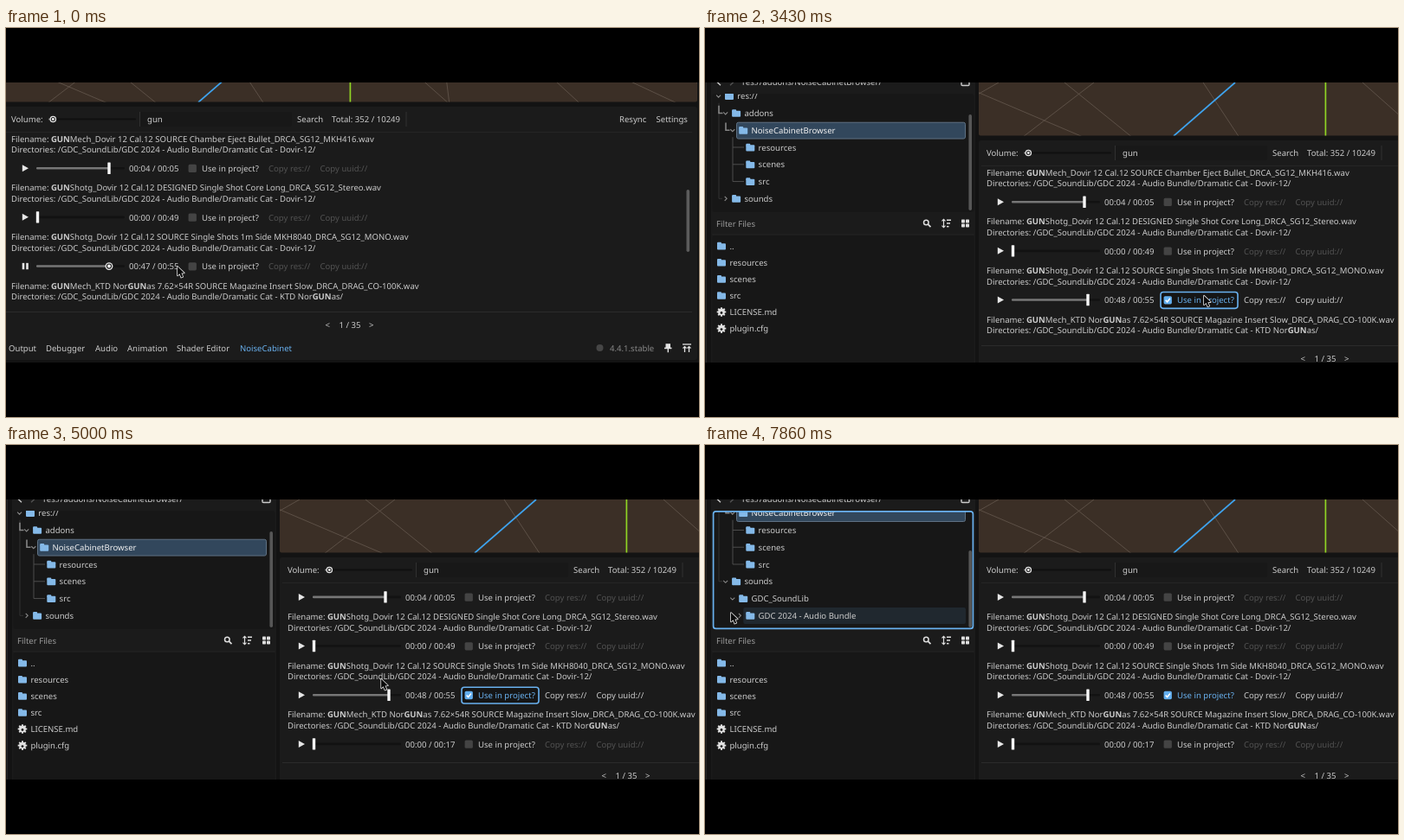
Write an HTML page with a canvas that moves like this. It is 800 px wide and 450 px high and loops after 8 s.

```html
<!DOCTYPE html>
<html lang="en">
<head>
<meta charset="utf-8">
<title>Sound browser</title>
<style>
html, body { margin: 0; width: 100%; height: 100%; overflow: hidden; background: #000; }
canvas { display: block; }
</style>
</head>
<body>
<canvas id="stage" width="800" height="450"></canvas>
<script>
const ctx = document.getElementById('stage').getContext('2d');
const LOOP = 8000, FPS = 7;
const FONT = '9.57px "Noto Sans", sans-serif';
const TEXT = '#cbcbcb', DIM = '#525252', BLUE = '#69b1ef', FOLDER = '#84b9e8';
const DOCK = { x: 319, y: 39 };
const TREE_PITCH = 19.77, ROW_PITCH = 56.67;

// Drawing helpers
function text(str, x, y, color = TEXT) {
  ctx.fillStyle = color;
  // Matches of the search term are bold
  for (const part of str.split(/(GUN)/)) {
    ctx.font = (part === 'GUN' ? 'bold ' : '') + FONT;
    ctx.fillText(part, x, y + 3.7);
    x += ctx.measureText(part).width;
  }
}
function rect(x, y, w, h, color, radius = 0) {
  ctx.fillStyle = color;
  ctx.beginPath();
  ctx.roundRect(x, y, w, h, radius);
  ctx.fill();
}
function outline(x, y, w, h, color, width = 1.6, radius = 3) {
  ctx.strokeStyle = color;
  ctx.lineWidth = width;
  ctx.beginPath();
  ctx.roundRect(x, y, w, h, radius);
  ctx.stroke();
}
function line(points, color, width = 1) {
  ctx.strokeStyle = color;
  ctx.lineWidth = width;
  ctx.beginPath();
  points.forEach(([x, y]) => ctx.lineTo(x, y));
  ctx.stroke();
}
function shape(points, color) {
  ctx.fillStyle = color;
  ctx.beginPath();
  points.forEach(([x, y]) => ctx.lineTo(x, y));
  ctx.fill();
}
function circle(x, y, r, color) {
  ctx.fillStyle = color;
  ctx.beginPath();
  ctx.arc(x, y, r, 0, 7);
  ctx.fill();
}
function clipped(x, y, w, h, draw) {
  ctx.save();
  ctx.beginPath();
  ctx.rect(x, y, w, h);
  ctx.clip();
  draw();
  ctx.restore();
}
function folder(x, y) {
  rect(x - 5, y - 4.2, 5, 3, FOLDER, 1);
  rect(x - 5, y - 2.8, 10, 7.2, FOLDER, 1);
}
function chevron(x, y, open) {
  line(open ? [[x - 2.5, y - 1], [x, y + 1.5], [x + 2.5, y - 1]]
            : [[x - 1, y - 2.5], [x + 1.5, y], [x - 1, y + 2.5]], '#8a8a8a', 1.1);
}
function gear(x, y) {
  for (let i = 0; i < 8; i++) {
    const a = i * Math.PI / 4;
    line([[x, y], [x + 5.3 * Math.cos(a), y + 5.3 * Math.sin(a)]], '#e0e0e0', 1.9);
  }
  circle(x, y, 3.9, '#e0e0e0');
  circle(x, y + 1, 1.4, '#1a1a1a');
}
function ring(x, y, r) {
  circle(x, y, r, '#e8e8e8');
  circle(x, y, r - 1.3, '#1b1b1b');
  circle(x, y, r - 2.4, '#f4f4f4');
}

// Motion
const smooth = u => u * u * (3 - 2 * u);
function follow(keys, t) {
  let i = 0;
  while (i < keys.length - 2 && t > keys[i + 1][0]) i++;
  const [a, b] = [keys[i], keys[i + 1]];
  const u = smooth(Math.min(1, Math.max(0, (t - a[0]) / (b[0] - a[0]))));
  return a.slice(1).map((v, k) => v + (b[k + 1] - v) * u);
}
// Pointer tip, relative to the panning desktop
const POINTER = [
  [0, 198, 276], [150, 198, 276], [950, 23, 276], [1300, 23, 276], [2150, 229, 278],
  [2430, 229, 278], [3300, 257, 270.7], [3600, 257, 270.7], [4300, 257, 257],
  [4720, 257, 257], [5560, -294, 160], [5720, -294, 160], [6400, -293, 156],
  [6900, -293, 156], [7250, -288, 156], [7700, -289, 155], [8000, -289, 155]
];
const PAN = [[2430, 0, 0], [3290, DOCK.x, DOCK.y]];
const SCROLL = [[0, 0], [3710, 25.3], [3855, 50.4], [3995, 75.5], [4565, 50.4], [4710, 25.3]];
const PAUSED = 1140, CHECKED = 2560, UNFOLD = [6140, 7280];

const FOLDER_PATH = '/GDC_SoundLib/GDC 2024 - Audio Bundle/Dramatic Cat - ';
const SOUNDS = [
  ['GUNMech_Dovir 12 Cal.12 SOURCE Chamber Eject Bullet_DRCA_SG12_MKH416', 'Dovir-12', '00:04 / 00:05', 119],
  ['GUNShotg_Dovir 12 Cal.12 DESIGNED Single Shot Core Long_DRCA_SG12_Stereo', 'Dovir-12', '00:00 / 00:49', 36.5],
  ['GUNShotg_Dovir 12 Cal.12 SOURCE Single Shots 1m Side MKH8040_DRCA_SG12_MONO', 'Dovir-12'],
  ['GUNMech_KTD NorGUNas 7.62×54R SOURCE Magazine Insert Slow_DRCA_DRAG_CO-100K', 'KTD NorGUNas', '00:00 / 00:17', 36.5],
  ['GUNRif_KTD NorGUNas 7.62×54R DESIGNED Single Shot Core Long_DRCA_DRAG_Stereo_05', 'KTD NorGUNas', '00:00 / 00:02', 36.5]
];

function soundRow(sound, index, y, t) {
  const [name, dir] = sound;
  let [, , time, knob] = sound;
  const active = index === 2, playing = active && t < PAUSED;
  const checked = active && t >= CHECKED;
  const focused = active && t >= 2250 && t < UNFOLD[0];
  if (active) {
    time = (t < 700 ? '00:47' : '00:48') + ' / 00:55';
    knob = playing ? 119 + 2.5 * t / PAUSED : 123;
  }
  text(`Filename: ${name}.wav`, 6, y);
  text(`Directories: ${FOLDER_PATH}${dir}/`, 6, y + 12.5);
  const c = y + 34.2;
  if (playing) {
    rect(18.7, c - 3.7, 2.6, 7.4, '#e6e6e6');
    rect(23.2, c - 3.7, 2.6, 7.4, '#e6e6e6');
  } else shape([[18.8, c - 4], [26, c], [18.8, c + 4]], '#e6e6e6');
  rect(35, c - 1.3, 102, 2.6, '#121212', 1);
  rect(35, c - 1.3, knob - 35, 2.6, '#777', 1);
  if (playing) ring(knob, c, 4.4);
  else rect(knob - 1.7, c - 6.7, 3.4, 13.4, '#f6f6f6', .5);
  text(time, 142, c);
  if (focused) {
    rect(207, c - 9, 89, 18.8, '#151515', 3);
    outline(207, c - 9, 89, 18.8, BLUE);
  }
  rect(210.6, c - 4.4, 9.3, 9.3, checked ? '#62aeee' : '#444', 1.6);
  if (checked) line([[212.7, c + .2], [214.6, c + 2.3], [217.9, c - 1.8]], '#fff', 1.5);
  text('Use in project?', 226, c, checked || focused ? BLUE : TEXT);
  text('Copy res://', 303, c, checked ? TEXT : DIM);
  text('Copy uuid://', 362.5, c, checked ? TEXT : DIM);
}

function soundList(t) {
  const layer = (scroll, alpha) => {
    ctx.globalAlpha = alpha;
    SOUNDS.forEach((sound, i) => soundRow(sound, i, 128 + i * ROW_PITCH - scroll, t));
    ctx.globalAlpha = 1;
  };
  clipped(0, 121, 782, 202, () => {
    if (t > 4420 && t < 4560) {
      layer(75.5, .4);
      layer(50.4, .6);
    } else layer(SCROLL.filter(s => s[0] <= t).pop()[1], 1);
  });
  rect(785.5, 187, 3.6, 72, '#5c5c5c', 1.8);
}

function viewport() {
  rect(-3, -80, 801, 165.4, '#3b2f26', 2);
  clipped(-3, -80, 801, 165.4, () => {
    const grid = [
      [-40, 20, 190, 118], [130, 24, 35, 97], [96, 24, 186, 97], [256, 24, 304, 97],
      [504, 24, 513, 97], [594, 24, 673, 97], [640, 24, 796, 97], [690, 24, 850, 82],
      [440, 24, 522, 97], [20, 24, -50, 64]
    ];
    for (const [x1, y1, x2, y2] of grid) line([[x1, y1], [x2, y2]], '#65594e', .8);
    line([[293, 24], [222, 86]], '#3ea3ee', 1.7);
    line([[397.4, 0], [397.4, 86]], '#8fd424', 1.7);
  });
}

function bottomPanel(t) {
  rect(-3, 91, 801, 293, '#1b1b1b', 3);
  text('Volume:', 6, 105.4);
  rect(49, 104.5, 101, 2, '#101010', 1);
  rect(49, 104.5, 5, 2, '#777', 1);
  ring(54.3, 105.5, 3.8);
  rect(155, 97, 175, 17, '#181818', 2);
  rect(154, 97, 1, 17, '#303030');
  text('gun', 163, 105.4);
  text('Search', 336, 105.4);
  text('Total: 352 / 10249', 376, 105.4);
  rect(461.5, 97, 1, 17, '#333');
  text('Resync', 708, 105.4);
  text('Settings', 750.5, 105.4);
  rect(0, 120, 792, 1, '#252525');
  soundList(t);
  rect(0, 328, 792, 1, '#2b2b2b');
  text('<', 368.5, 343.4);
  text('1 / 35', 384.5, 343.4);
  text('>', 419, 343.4);

  const tabs = [['Output', 3], ['Debugger', 46], ['Audio', 103], ['Animation', 140], ['Shader Editor', 197]];
  for (const [label, x] of tabs) text(label, x, 370);
  text('NoiseCabinet', 270, 370, BLUE);
  circle(685.5, 370, 4, '#464646');
  text('4.4.1.stable', 697, 370, '#878787');
  rect(761.5, 365.2, 5.5, 5, '#e2e2e2');
  rect(760, 369.6, 8.5, 1.6, '#e2e2e2');
  rect(763.6, 371, 1.4, 4.2, '#e2e2e2');
  rect(781, 365.3, 10, 1.3, '#e2e2e2');
  for (const x of [783.5, 788.5]) {
    line([[x, 375], [x, 368.5]], '#e2e2e2', 1.3);
    line([[x - 2, 370.5], [x, 368.5], [x + 2, 370.5]], '#e2e2e2', 1.2);
  }
}

function fileTree(t) {
  const unfolded = UNFOLD.filter(at => t >= at).length;
  const rows = [
    ['res://', 0, true], ['addons', 1, true], ['NoiseCabinetBrowser', 2, true], ['resources', 3],
    ['scenes', 3], ['src', 3], ['sounds', 1, unfolded > 0],
    ['GDC_SoundLib', 2, unfolded > 1], ['GDC 2024 - Audio Bundle', 3, false]
  ].slice(0, 7 + unfolded);
  const top = 78.7 - unfolded * TREE_PITCH;
  const rowY = i => top + i * TREE_PITCH;

  clipped(9, 76, 301, 136, () => {
    line([[16, rowY(0) + 8], [16, rowY(6)], [20, rowY(6)]], '#333');
    line([[16, rowY(0) + 11], [16, rowY(1)], [20.5, rowY(1)]], '#858585', 1.6);
    line([[24, rowY(1) + 11], [24, rowY(2)], [28.5, rowY(2)]], '#858585', 1.6);
    line([[32, rowY(2) + 8], [32, rowY(5)]], '#4d4d4d');
    for (let i = 3; i < 6; i++) line([[32, rowY(i)], [45, rowY(i)]], '#4d4d4d');
    rows.forEach(([label, depth, open], i) => {
      const y = rowY(i), x = depth * 8.1;
      if (i === 2) {
        rect(36.5, y - 9, 264, 18.8, '#32475c', 2);
        outline(36.5, y - 9, 264, 18.8, '#5f7183', 1, 2);
      } else if (i === rows.length - 1 && t > 5500) {
        rect(x + 20, y - 9.4, 281 - x, 19.2, '#20282f', 2);
      }
      if (open !== undefined) chevron(x + 15.6, y, open);
      folder(x + 28, y);
      text(label, x + 37.3, y, i === 2 ? '#f0f0f0' : TEXT);
    });
    rect(304.4, 100 + unfolded * 11, 3.6, 111 - unfolded * 11, '#565656', 1.8);
  });
  if (unfolded) outline(9.6, 76.8, 299.8, 135.6, BLUE, 1.7, 3);
}

function fileDock(t) {
  ctx.save();
  ctx.translate(-DOCK.x, -DOCK.y);
  rect(1, 40, 1, 400, '#262626');
  rect(7, 40, 305, 400, '#1b1b1b', 3);
  line([[18, 58.8], [14, 62.5], [18, 66.2]], TEXT, 1.4);
  line([[29, 58.8], [33, 62.5], [29, 66.2]], DIM, 1.4);
  text('res://addons/NoiseCabinetBrowser/', 43, 62);
  outline(296, 58, 9, 8.5, TEXT, 1.4, 1);
  rect(8.5, 76, 302, 137, '#171717', 3);
  fileTree(t);

  text('Filter Files', 13, 226, '#9a9a9a');
  ctx.strokeStyle = '#dedede';
  ctx.lineWidth = 1.5;
  ctx.beginPath();
  ctx.arc(255.3, 225, 2.8, 0, 7);
  ctx.stroke();
  line([[257.4, 227.1], [260.5, 230.2]], '#dedede', 1.7);
  line([[275.5, 221.5], [275.5, 230.5]], '#dedede', 1.2);
  line([[273.5, 223.4], [275.5, 221.4], [277.5, 223.4]], '#dedede', 1.2);
  line([[273.5, 228.6], [275.5, 230.6], [277.5, 228.6]], '#dedede', 1.2);
  [5, 4, 2.5].forEach((w, i) => rect(279, 221.5 + i * 3.7, w, 1.5, '#dedede'));
  for (const x of [296, 301]) for (const y of [221.5, 226.5]) rect(x, y, 4, 4, '#dedede', .7);

  rect(8.5, 239, 302, 200, '#171717', 3);
  rect(8.5, 238.5, 302, 1, '#262626');
  ['..', 'resources', 'scenes', 'src', 'LICENSE.md', 'plugin.cfg'].forEach((label, i) => {
    const y = 252 + i * 19.12;
    (i < 4 ? folder : gear)(19, y);
    text(label, 28.4, y);
  });
  ctx.restore();
}

function pointer(x, y) {
  const path = new Path2D('M0 0V10.5L2.5 8.3L4.3 12.6L6.2 11.8L4.4 7.6L7.8 7.4Z');
  ctx.save();
  ctx.translate(x, y);
  ctx.lineJoin = 'round';
  ctx.lineWidth = 1.6;
  ctx.strokeStyle = '#e0e0e0';
  ctx.stroke(path);
  ctx.fillStyle = '#090909';
  ctx.fill(path);
  ctx.restore();
}

function render(t) {
  ctx.fillStyle = '#000';
  ctx.fillRect(0, 0, 800, 450);
  const [panX, panY] = follow(PAN, t);
  clipped(0, 63, 800, 324, () => {
    rect(0, 63, 800, 324, '#131313');
    ctx.translate(panX, panY);
    viewport();
    bottomPanel(t);
    fileDock(t);
    pointer(...follow(POINTER, t));
  });
}

ctx.textRendering = 'geometricPrecision';
const start = performance.now();
function tick() {
  const elapsed = (performance.now() - start) % LOOP;
  render(Math.floor((elapsed + 5) * FPS / 1000) * 1000 / FPS);
  requestAnimationFrame(tick);
}
tick();
</script>
</body>
</html>
```
